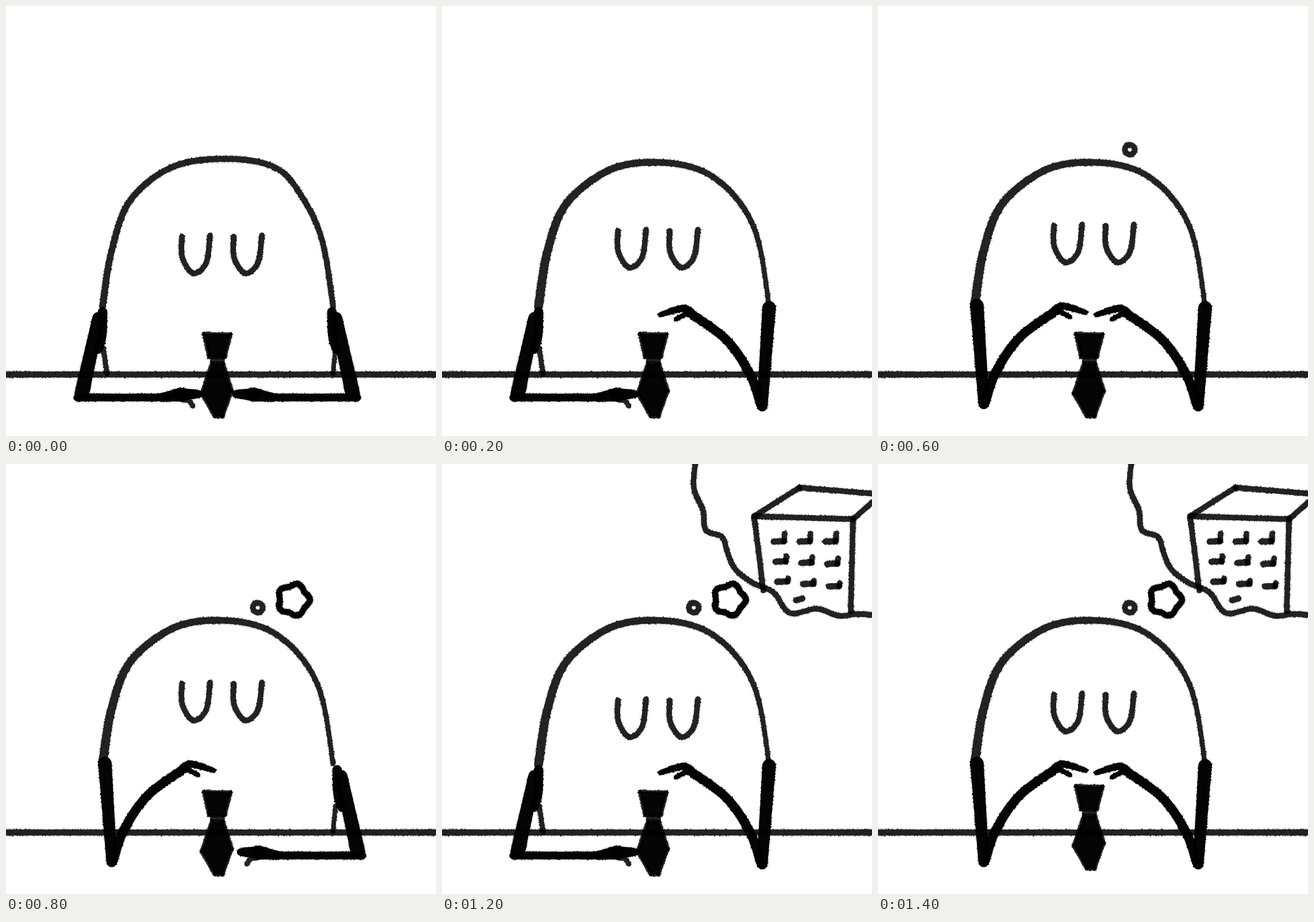
An HTML page with a canvas that plays this animation: 748x748 px, repeating every 2 s.

```html
<!DOCTYPE html>
<html lang="en">
<head>
<meta charset="utf-8">
<title>Thinking at the desk</title>
<style>
  html, body { margin: 0; width: 100%; height: 100%; overflow: hidden; background: #fff; }
  canvas { display: block; width: 100vw; height: 100vh; }
</style>
</head>
<body>
<canvas id="stage" width="748" height="748"></canvas>
<script>
const ctx = document.getElementById('stage').getContext('2d');
const INK = 0.86, DARK = 0.98;
let seed = 1;
const rnd = () => (seed = seed * 16807 % 2147483647) / 2147483647;

// Samples a smooth curve through flat x,y pairs.
function curve(flat) {
  const p = [], out = [];
  for (let i = 0; i < flat.length; i += 2) p.push([flat[i], flat[i + 1]]);
  const at = i => p[Math.max(0, Math.min(p.length - 1, i))];
  for (let i = 0; i < p.length - 1; i++) {
    const [a, b, c, d] = [at(i - 1), at(i), at(i + 1), at(i + 2)];
    const steps = Math.ceil(Math.hypot(c[0] - b[0], c[1] - b[1]) / 1.4);
    for (let k = 0; k < steps; k++) {
      const t = k / steps;
      out.push([0, 1].map(j => b[j] + t / 2 * (c[j] - a[j]
        + t * (2 * a[j] - 5 * b[j] + 4 * c[j] - d[j]
        + t * (3 * (b[j] - c[j]) + d[j] - a[j])))));
    }
  }
  return [...out, p[p.length - 1]];
}

function dab(x, y, r) {
  ctx.moveTo(x + r, y);
  ctx.arc(x, y, r, 0, 7);
}

// Charcoal line whose width runs from w0 to w1: grey fringe, then a rough core.
function brush(flat, w0, w1 = w0, alpha = INK) {
  const pts = curve(flat);
  seed = 1 + Math.round(Math.abs(flat[0] * 91 + flat[1] * 37));
  for (const [solid, a, reach] of [[false, 0.3, 1.3], [true, alpha, 0.3]]) {
    ctx.fillStyle = `rgba(0,0,0,${a})`;
    ctx.beginPath();
    pts.forEach(([x, y], i) => {
      const r = (w0 + (w1 - w0) * i / pts.length) / 2;
      if (solid) dab(x, y, r - 0.2);
      for (let k = 0; k < 2; k++) {
        const ang = rnd() * 6.283, d = r + reach - rnd() * 1.2;
        dab(x + Math.cos(ang) * d, y + Math.sin(ang) * d, 0.6 + rnd() * 0.7);
      }
    });
    ctx.fill();
  }
}

// Filled straight-sided shape with charcoal edges.
function solid(...corners) {
  ctx.fillStyle = `rgba(0,0,0,${DARK})`;
  ctx.beginPath();
  corners.forEach(c => ctx.lineTo(...c));
  ctx.fill();
  corners.forEach((c, i) => brush([...c, ...corners[(i + 1) % corners.length]], 6));
}

// Closed ring with a number of soft lobes.
function ring(cx, cy, radius, lobe, w, alpha) {
  const flat = [];
  for (let a = 0; a <= 6.29; a += Math.PI / 20) {
    const r = radius + lobe * Math.cos(5 * a);
    flat.push(cx + r * Math.cos(a), cy + r * Math.sin(a));
  }
  brush(flat, w, w, alpha);
}

function moved(dx, dy, draw, flip = 1) {
  ctx.save();
  ctx.transform(flip, 0, 0, 1, dx, dy);
  draw();
  ctx.restore();
}

function head(peak, top, w0, w1) {
  brush([168,522, 184,425, 217,top + 71, 292,top + 13, peak,top, peak + 80,top + 16,
    515,top + 66, 550,408, 569,522], w0, w1);
}
const heads = {
  tall: () => head(390, 266, 12, 10),
  low: () => head(390, 277, 12, 10),
  wide: () => head(375, 272, 16, 8)
};

function eyes() {
  for (const x of [306, 396])
    brush([x,401, x + 1,438, x + 20,465, x + 42,447, x + 49,399], 10);
}

function tie() {
  solid([344, 570], [391, 571], [381, 611], [353, 611]);
  brush([360,616, 376,616], 10);
  solid([358, 622], [378, 622], [393, 669], [377, 714], [363, 714], [340, 674]);
}

function armDown(thumb) {
  brush([168,532, 167,575, 160,598], 17, 15, DARK);
  brush([161,543, 132,674], 22, 26, DARK);
  brush([124,681, 280,681], 14, 14, DARK);
  brush([336,675, 304,676], 13, 25, DARK);
  brush([304,676, 270,681], 25, 14, DARK);
  if (thumb) brush([306,685, 318,687, 325,696], 9);
}

function armUp() {
  brush([172,521, 184,692], 24, 19, DARK);
  brush([186,690, 205,637, 246,577, 311,529], 17, 16, DARK);
  brush([308,529, 323,522, 361,533], 15, 9, DARK);
  brush([314,530, 334,541], 10, 8, DARK);
}

function building() {
  const front = [543, 91], corner = [715, 96], back = [622, 41];
  const edges = [[front, corner], [front, [559, 220]], [corner, [711, 256]],
    [front, back], [back, [756, 52]], [corner, [756, 60]]];
  for (const [a, b] of edges) brush([...a, ...b], 10);
  for (let row = 0; row < 3; row++) {
    for (let col = 0; col < 3; col++) {
      const x = 595 + 45 * col + 3 * row, y = 135 + 35 * row + 2 * row * col;
      brush([x - 18,y, x,y - 1], 11);
      brush([x,y, x + 1,y - 14 + 4 * row], 10);
    }
  }
  brush([616,237, 627,234], 11);
}

const thoughts = [
  () => ring(438, 250, 8.5, 0, 10, INK),
  () => ring(500, 236, 26, 2.5, 11, DARK),
  () => brush([442,-10, 438,40, 454,81, 459,115, 487,127, 497,155, 511,184, 541,207,
    577,224, 605,259, 652,252, 690,264, 722,261, 760,264], 10),
  building
];

// head shape, left arm up, right arm up, eye offset, tie offset
const poses = [
  ['tall', 0, 0, 0, 0],
  ['wide', 0, 1, -10, 0],
  ['wide', 1, 1, -19, 0],
  ['wide', 1, 1, -19, 0],
  ['wide', 1, 0, -19, 0],
  ['low', 0, 0, 0, 6],
  ['wide', 0, 1, 10, 0],
  ['wide', 1, 1, 0, -10]
];

function draw(step) {
  const [shape, left, right, eyeY, tieY] = poses[step];
  ctx.fillStyle = '#fff';
  ctx.fillRect(0, 0, 748, 748);
  brush([-8,641, 756,641], 11);
  heads[shape]();
  moved(0, eyeY, eyes);
  moved(0, tieY, tie);

  if (left) armUp();
  else {
    brush([169,595, 176,640], 9);
    armDown(true);
  }
  if (right) moved(741, 4, armUp, -1);
  else {
    brush([573,595, 569,640], 8);
    moved(left ? 744 : 735, 0, () => armDown(left), -1);
  }
  thoughts.slice(0, Math.max(0, step - 2)).forEach(t => t());
}

let shown = -1;
function tick() {
  const step = Math.min(7, Math.floor(performance.now() % 2000 / 200));
  if (step !== shown) draw(shown = step);
  requestAnimationFrame(tick);
}
tick();
</script>
</body>
</html>
```
